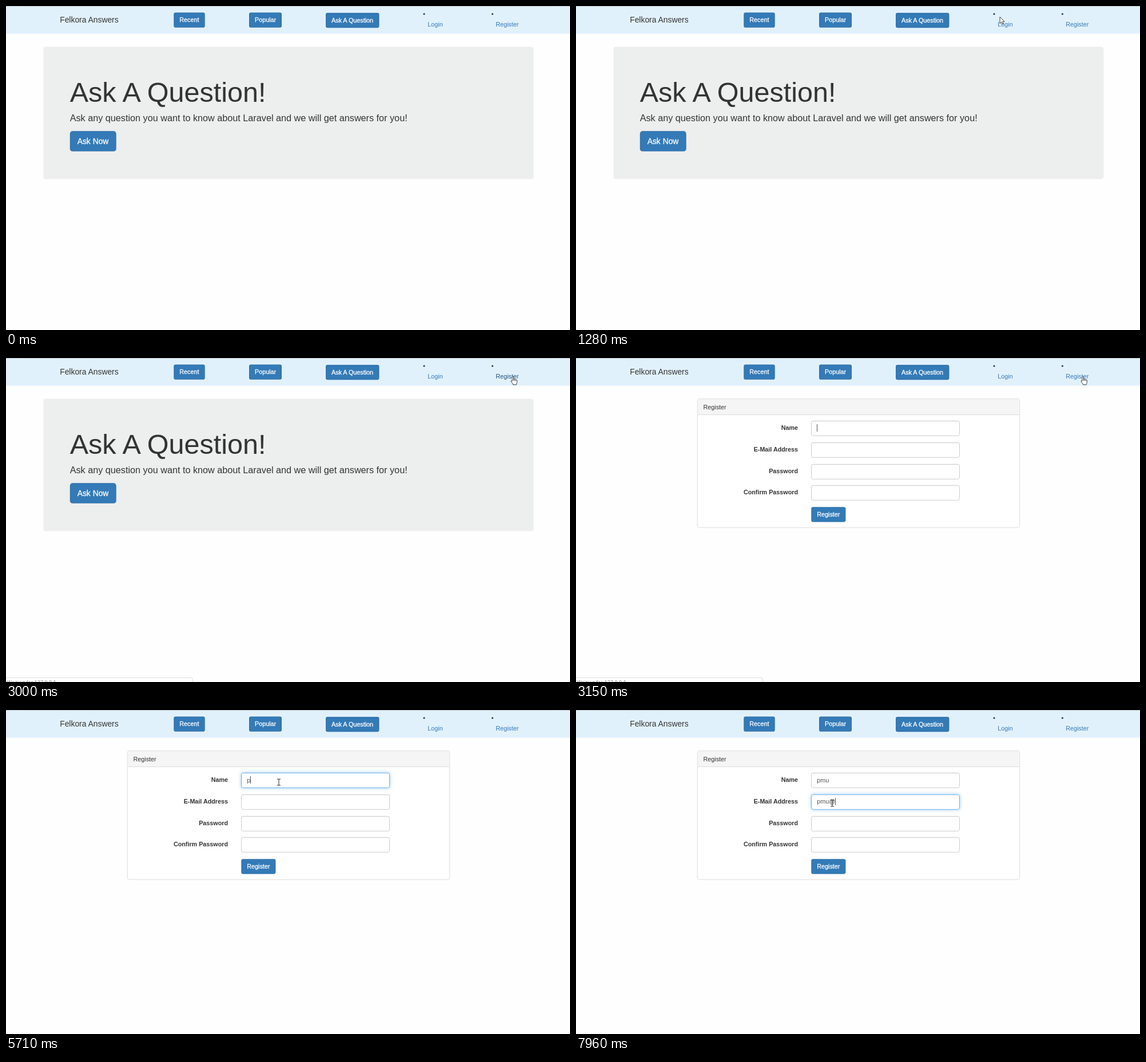
These frames come from a looping animation (986x568 px, 8000 ms). An HTML page with a canvas:

```html
<!DOCTYPE html>
<html lang="en">
<head>
<meta charset="utf-8">
<title>Question board</title>
<style>
  html, body { margin: 0; width: 100%; height: 100%; overflow: hidden; background: #fefefe; }
  canvas { display: block; }
</style>
</head>
<body>
<canvas id="stage" width="986" height="568"></canvas>
<script>
const ctx = document.getElementById('stage').getContext('2d');
ctx.textRendering = 'optimizeLegibility'; // kerns across spaces too
ctx.fontKerning = 'normal';

const LOOP = 8000;
const SLACK = 5; // tolerance for rounded step times
const SANS = '"Liberation Sans", Arial, sans-serif';
const BASE = 10.78;
const INK = '#333', BLUE = '#337ab7', WHITE = '#fff';
const USER = 'pmu';
const FIELD = { x: 411.5, w: 259, h: 26, top: 110, gap: 37.75, textX: 421.3 };
const LABELS = ['Name', 'E-Mail Address', 'Password', 'Confirm Password'];

// Pointer moves: start, end, number of steps, shape, way-points
const MOVES = [
  [340, 500, 3, 'arrow', [[692, 389], [710, 280], [726, 181]]],
  [650, 1110, 7, 'arrow', [[701, 199], [717, 130], [738, 55], [750, 12], [744, 17]]],
  [1280, 1740, 7, 'arrow', [[741, 19], [770, 27], [840, 36], [899, 37]]],
  [1890, 1890, 1, 'arrow', [[896, 35]]],
  [1967, 2120, 3, 'hand', [[892, 34], [886, 33]]],
  [2290, 2290, 1, 'hand', [[886, 32]]],
  [2360, 2360, 1, 'none', [[886, 32]]],
  [2680, 2680, 1, 'ring', [[885.5, 32.5]]],
  [2830, 2830, 1, 'hand', [[886, 32]]],
  [3460, 3690, 4, 'arrow', [[868, 36], [780, 62], [682, 96]]],
  [3767, 3920, 3, 'beam', [[600, 116], [530, 124], [481, 128]]],
  [4070, 4150, 2, 'beam', [[479, 128], [477, 126.5]]],
  [6090, 6490, 6, 'beam', [[473, 130], [459, 150], [450, 162], [448, 163.5]]]
];

// Times at which the caret turns on or off, in turn
const BLINKS = [3150, 3680, 4230, 4700, 5250, 6330, 6410, 6950, 7110, 7880, 7960];
const NAME_KEYS = [5710, 5790, 5940];
const MAIL_KEYS = [7110, 7180, 7330, 7960];

const clamp = v => Math.max(0, Math.min(1, v));
const countPast = (times, t) => times.filter(at => t >= at - SLACK).length;

function text(str, x, y, size = BASE, color = INK, weight = 'normal', align = 'left') {
  ctx.font = `${weight} ${size}px ${SANS}`;
  ctx.fillStyle = color;
  ctx.textAlign = align;
  ctx.fillText(str, x, y);
  if (color === WHITE) { // light text reads slightly heavier
    ctx.strokeStyle = color;
    ctx.lineWidth = 0.3;
    ctx.strokeText(str, x, y);
  }
}

function box(x, y, w, h, r, fill, stroke) {
  ctx.beginPath();
  ctx.roundRect(x, y, w, h, r);
  if (fill) { ctx.fillStyle = fill; ctx.fill(); }
  if (stroke) { ctx.strokeStyle = stroke; ctx.lineWidth = 1; ctx.stroke(); }
}

function button(label, x, y, w, h = 26.2, size = BASE, pad = 10) {
  const r = h > 30 ? 4.6 : 3.1, edge = 0.77;
  box(x, y, w, h, r, '#2e6da4');
  box(x + edge, y + edge, w - 2 * edge, h - 2 * edge, r - edge, BLUE);
  text(label, x + pad, y + h / 2 + size * 0.335, size, WHITE);
}

function navBar(hover) {
  ctx.fillStyle = '#e1f1fc';
  ctx.fillRect(0, 0, 986, 48.5);
  ctx.fillStyle = '#bcc5ca';
  ctx.fillRect(0, 0, 986, 1);
  text('Felkora Answers', 94.2, 28.8, 13.86);
  button('Recent', 293.3, 11.6, 54.4);
  button('Popular', 425, 11.6, 57);
  button('Ask A Question', 559, 12, 93.4);
  for (const x of [731, 850.4]) {
    ctx.beginPath();
    ctx.arc(x, 14, 1.6, 0, Math.PI * 2);
    ctx.fillStyle = INK;
    ctx.fill();
  }
  text('Login', 737.3, 35.6, BASE, BLUE);
  text('Register', 856.2, 35.6, BASE, hover ? '#23527c' : BLUE);
}

function welcome() {
  box(65.4, 71.4, 857, 232.2, 4.6, '#edeeee');
  text('Ask A Question!', 111.7, 167.7, 48.55);
  text('Ask any question you want to know about Laravel and we will get answers for you!',
    111.7, 202, 16.22);
  button('Ask Now', 111.8, 219.3, 80.9, 35.5, 13.86, 12.9);
}

function field(row, focus) {
  const { x, w, h, top, gap } = FIELD;
  const y = Math.round(top + row * gap) + 0.3;
  const mix = (a, b) => Math.round(a + (b - a) * focus);
  ctx.save();
  if (focus) {
    ctx.shadowColor = `rgba(102,175,233,${0.6 * focus})`;
    ctx.shadowBlur = 6.2;
  }
  box(x - 0.5, y - 0.5, w + 1, h + 1, 3, WHITE);
  ctx.restore();
  ctx.fillStyle = 'rgba(0,0,0,.04)';
  ctx.fillRect(x + 1, y + 0.5, w - 2, 1);
  box(x, y, w, h, 3, null, `rgb(${mix(204, 102)},${mix(204, 175)},${mix(204, 233)})`);
}

function registerForm(t) {
  box(212.3, 71.6, 563.4, 225.6, 3, WHITE, '#ddd');
  box(212.8, 72, 562.4, 27.5, [3, 3, 0, 0], '#f5f5f5');
  ctx.fillStyle = '#ddd';
  ctx.fillRect(212.3, 99, 563.4, 1);
  text('Register', 222.6, 89.7);

  const away = clamp((t - 6280) / 150);
  const focus = [clamp((t - 3155) / 150) * (1 - away), away, 0, 0];
  LABELS.forEach((label, row) => {
    field(row, focus[row]);
    text(label, 388, 126.1 + row * FIELD.gap, BASE, INK, 'bold', 'right');
  });
  button('Register', 411.3, 261.2, 60.1);

  const values = [
    USER.slice(0, countPast(NAME_KEYS, t)),
    (USER + '@').slice(0, countPast(MAIL_KEYS, t))
  ];
  values.forEach((value, row) =>
    text(value, FIELD.textX, 126.7 + row * FIELD.gap, BASE, '#555'));

  if (countPast(BLINKS, t) % 2) {
    const row = t >= 6330 - SLACK ? 1 : 0;
    ctx.fillStyle = '#555';
    ctx.fillRect(Math.round(FIELD.textX + ctx.measureText(values[row]).width),
      116 + row * 38, 1, 13);
  }
}

function statusBar(label) {
  box(-4, 560.7, 330.4, 14, 3, WHITE, '#dcdcdc');
  ctx.font = '9px "Open Sans", "Noto Sans", sans-serif';
  ctx.fillStyle = '#777';
  ctx.textAlign = 'left';
  ctx.fillText(label, 1.5, 572);
}

const shapes = {
  none() {},
  arrow() {
    outline('M0 0V11.6L2.7 9.1L4.4 13L6.3 12.2L4.7 8.4H8.2Z');
  },
  hand() {
    outline('M-1.2 1.2Q0 -.6 1.2 1.2V5.2Q2.4 4.2 3.3 5.6Q4.6 4.8 5.4 6.2Q7.4 5.8 7.4 7.6' +
      'V10.4Q7.3 12 6.3 13.2V14.8H.3V13.6L-3 9.4Q-3.6 7.6 -1.2 8.5Z');
    ctx.stroke(new Path2D('M1.2 5V8M3.3 5.8V8M5.4 6.4V8.2'));
  },
  beam() {
    ctx.strokeStyle = '#222';
    ctx.lineWidth = 1;
    ctx.stroke(new Path2D('M-3 -5.5H-1Q0 -5.5 0 -4.5Q0 -5.5 1 -5.5H3M0 -4.5V4.5' +
      'M-3 5.5H-1Q0 5.5 0 4.5Q0 5.5 1 5.5H3'));
  },
  ring() {
    ctx.beginPath();
    ctx.arc(0, 0, 7.3, 0, Math.PI * 2);
    ctx.strokeStyle = '#3aa9d8';
    ctx.lineWidth = 3.6;
    ctx.stroke();
  }
};

function outline(d) {
  const path = new Path2D(d);
  ctx.fillStyle = WHITE;
  ctx.strokeStyle = '#111';
  ctx.lineWidth = 0.8;
  ctx.fill(path);
  ctx.stroke(path);
}

function along(points, u) {
  const pos = u * (points.length - 1);
  const i = Math.min(Math.floor(pos), points.length - 1);
  const a = points[i], b = points[i + 1] || a;
  return a.map((v, axis) => v + (b[axis] - v) * (pos - i));
}

function pointer(t) {
  const move = MOVES.filter(m => t >= m[0] - SLACK).pop();
  if (!move) return;
  const [start, end, steps, shape, points] = move;
  const last = steps - 1;
  const step = last && Math.min(last, Math.floor((t - start + SLACK) / (end - start) * last));
  const [x, y] = along(points, last ? step / last : 0);
  ctx.save();
  ctx.translate(x, y);
  shapes[shape]();
  ctx.restore();
}

function draw(t) {
  ctx.fillStyle = '#fefefe';
  ctx.fillRect(0, 0, 986, 568);
  const loaded = t >= 3150 - SLACK;
  navBar(t >= 1967 && !loaded);
  if (loaded) registerForm(t);
  else welcome();
  if (t >= 2040 && t < 3460 - SLACK)
    statusBar(t < 3000 - SLACK ? '127.0.0.1:8000/register' : 'Waiting for 127.0.0.1...');
  pointer(t);
}

function tick() {
  draw(performance.now() % LOOP);
  requestAnimationFrame(tick);
}
tick();
</script>
</body>
</html>
```
